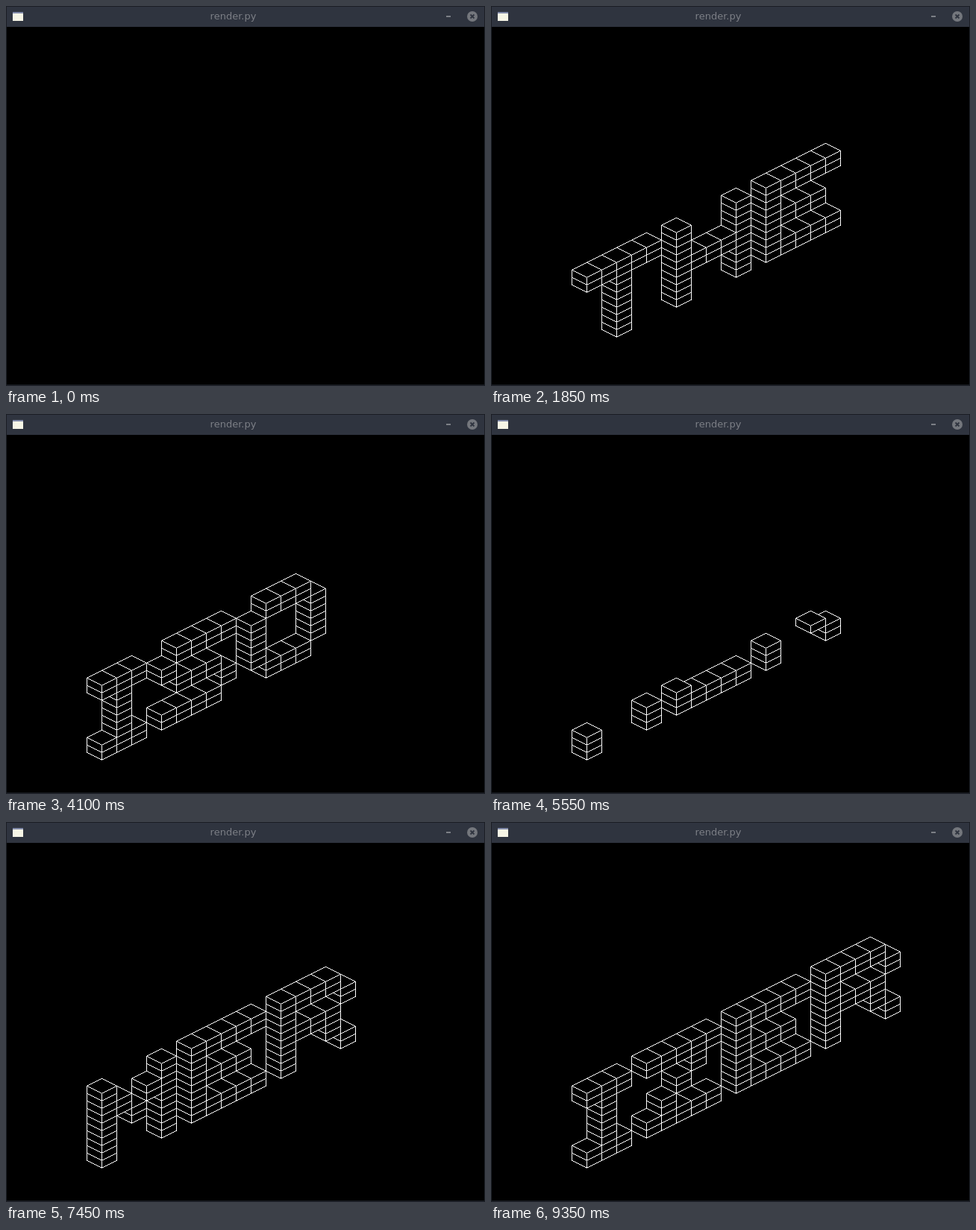
These frames come from a looping animation (642x510 px, 9400 ms). An HTML page with a canvas:

```html
<!DOCTYPE html>
<html>
<head>
<meta charset="utf-8">
<style>
  html, body { margin: 0; width: 100%; height: 100%; overflow: hidden; background: #000; }
  canvas, svg { position: absolute; left: 0; top: 0; }
  text { font: 13px "DejaVu Sans", sans-serif; fill: #7c7f86; text-anchor: middle; }
</style>
</head>
<body>
<canvas id="stage" width="642" height="510"></canvas>
<svg width="642" height="510">
  <path d="M0 0H642V510H0ZM1 28V508H641V28Z" fill="#1b1e25" fill-rule="evenodd"/>
  <path d="M1 1H641V28H1Z" fill="#2f343f"/>
  <path d="M9 8H23V20H9Z" fill="#f6f5e6"/>
  <path d="M9 8H23V10H9Z" fill="#8089a8"/>
  <text x="304.5" y="18">render.py</text>
  <path d="M590 13H596V15H590Z" fill="#7c7f86"/>
  <circle cx="625" cy="14" r="7" fill="#74777d"/>
  <path d="M622.5 11.5l5 5m0-5l-5 5" stroke="#2f343f" stroke-width="1.8"/>
</svg>
<script>
const LOOP = 9400, LAYER_MS = 100, LAYERS = 10;

// Five rows per letter, top to bottom; every row is two layers high.
const FONT = {
  T: 'XXXXX ..X.. ..X.. ..X.. ..X..',
  H: 'X...X X...X XXXXX X...X X...X',
  E: 'XXXXX X.... XXXX. X.... XXXXX',
  I: 'XXX .X. .X. .X. XXX',
  S: '.XXXX X.... .XXX. ....X XXXX.',
  O: '.XXX. X...X X...X X...X .XXX.',
  M: 'X...X XX.XX X.X.X X...X X...X',
  R: 'XXXX. X...X XXXX. X..X. X...X',
  Z: 'XXXXX ...X. ..X.. .X... XXXXX'
};
const SCENES = [
  { word: 'THE', from: 200, to: 2350 },
  { word: 'ISO', from: 2800, to: 4900 },
  { word: 'MER', from: 5350, to: 7500 },
  { word: 'IZER', from: 7950, to: LOOP }
];
for (const scene of SCENES) {
  const glyphs = [...scene.word].map(c => FONT[c].split(' '));
  scene.rows = [0, 1, 2, 3, 4].map(r => glyphs.map(g => g[r]).join('.'));
}

const ctx = document.getElementById('stage').getContext('2d');

function box(color, x, y, w, h) {
  ctx.fillStyle = color;
  ctx.fillRect(x, y, w, h);
}

// Slab whose upper front corner is at (x, y), drawn in one-pixel columns.
// Every sloped edge rounds upwards to whole pixels.
function slab(x, y) {
  for (let dx = -20; dx <= 20; dx++) {
    const slope = Math.abs(dx) / 2;
    const back = Math.floor(y - 20 + slope), front = Math.floor(y - slope), base = front + 10;
    box('#000', x + dx, back, 1, base - back);
    for (const edge of [back, front, base]) box('#fff', x + dx, edge, 1, 1);
    if (dx % 20 === 0) box('#fff', x + dx, front, 1, 10);
  }
}

function draw(scene, layers) {
  box('#000', 0, 0, 642, 510);
  for (let z = 0; z < layers; z++) {
    const row = scene.rows[4 - (z >> 1)];
    for (let col = row.length - 1; col >= 0; col--) {
      if (row[col] === 'X') slab(128 + 20 * col, 454 - 10 * col - 10 * z);
    }
  }
}

let shown;
function tick() {
  const t = performance.now() % LOOP;
  const scene = SCENES.find(s => t >= s.from && t < s.to);
  const layers = scene ? Math.min(LAYERS, 1 + Math.floor((t - scene.from) / LAYER_MS)) : 0;
  const state = (scene ? scene.word : '') + layers;
  if (state !== shown) {
    draw(scene, layers);
    shown = state;
  }
  requestAnimationFrame(tick);
}
tick();
</script>
</body>
</html>
```
